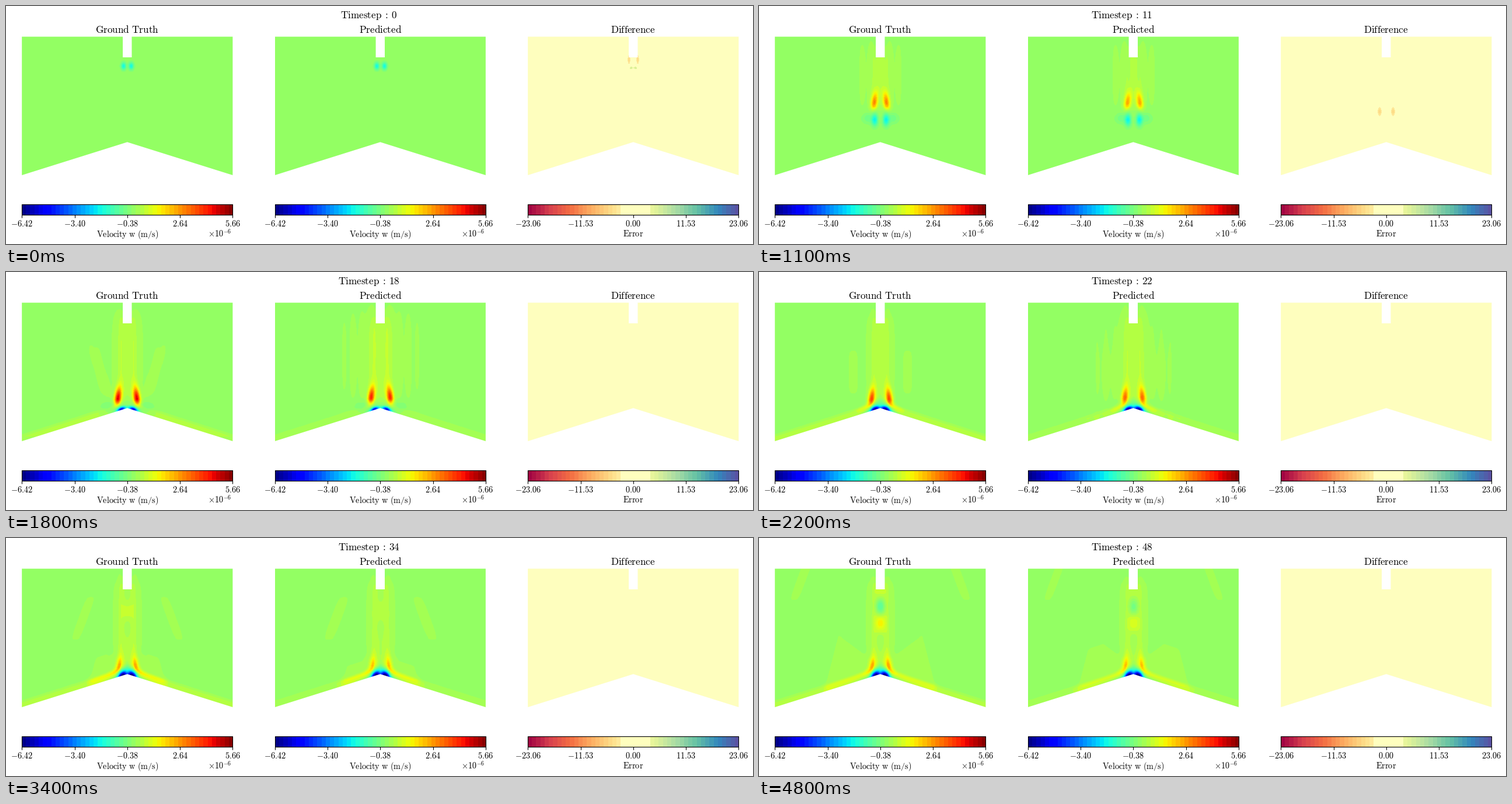
Write a matplotlib script that moves like this. It is 1280 px wide and 408 px high and loops after 4900 ms.

```python
import numpy as np
import matplotlib.pyplot as plt
from matplotlib.animation import FuncAnimation
from matplotlib.patches import Polygon, Rectangle

plt.rcParams["mathtext.fontset"] = "cm"

W, H, DPI = 1280, 408, 100
STEPS = 49
LEFT, PITCH, PANEL_W = 27.2, 433.5, 361.2
TOP, BOTTOM, APEX = 52.6, 290, 233.3
SLOT_BOTTOM, SLOT_HALF = 88, 7.7
BAR_TOP, BAR_BOTTOM = 340, 358
BIG, SMALL = 17.2, 14.3
BANDS = 50
VEL_RANGE = (-6.42, 5.66)
ERR_RANGE = (-23.06, 23.06)

fig = plt.figure(figsize=(W / DPI, H / DPI), dpi=DPI, facecolor="white")
ax = fig.add_axes([0, 0, 1, 1])

# Half-panel grid: distance from the axis, depth and height above the floor.
U, Y = np.meshgrid(np.arange(181.0), np.arange(53, BOTTOM) + 0.5)
FLOOR = APEX + U * (BOTTOM - APEX) / 180.5
Z = FLOOR - Y


def band_colors(name):
    return plt.get_cmap(name)((np.arange(BANDS) + 0.5) / BANDS)


JET = band_colors("jet")
SPECTRAL = band_colors("Spectral")
SPECTRAL[22:29] = plt.get_cmap("Spectral")(0.5)


def ramp(t, start, end, v0=0.0, v1=1.0):
    """Straight change from v0 to v1 between two steps, held outside."""
    return v0 + (v1 - v0) * np.clip((t - start) / (end - start), 0, 1)


def soft(x):
    """Smooth step from 0 to 1 around x = 0."""
    return 0.5 + 0.5 * np.tanh(x / 2)


def spot(du, dy, a, b):
    return np.exp(-((du / a) ** 2 + (dy / b) ** 2) / 2)


def plate(du, dy, a, b):
    """Flat patch with a firm rim."""
    return np.exp(-(du / a) ** 4 - (dy / b) ** 4)


def sinking_front(t):
    y = min(104 + 8.3 * t, 235)
    left = 1 - ramp(t, 14, 18)
    core = spot(U - 6 - 0.28 * t, Y - y, 3.1 + 0.07 * t, ramp(t, 0, 7, 4.5, 7.5))
    skirt = spot(U - ramp(t, 0, 18, 7, 30), Y - y + 3,
                 ramp(t, 0, 18, 3, 10), 6.5)
    return (-1.9 * left * core
            - 0.55 * ramp(t, 1, 5) * (1 - ramp(t, 18, 24)) * skirt)


def hot_trail(t, heat):
    """Teardrop that follows the front and cools once it has landed."""
    dy = Y - min(64 + 9.4 * t, 217 - 2 * (heat < 1))
    height = np.where(dy < 0, 13, 6.5)
    u = 10 + ramp(t, 13, 18, 0, 6) - ramp(t, 18, 27, 0, 2)
    amp = ramp(t, 0, 18, 0, 4.3) - ramp(t, 18, 27, 0, 3.6)
    return heat * amp * spot(U - u - 0.12 * dy, dy, 3.9, height)


def turning_jet(t, heat):
    """Rising stem that bends outward along the floor, as in corner flow."""
    reach = ramp(t, 18, 48, 30, 95)
    p, q = np.maximum(U - 9, 0), np.maximum(Z - 6, 0)
    off = (p * q - 45) / np.maximum(np.hypot(p, q), 1)
    landed = ramp(t, 17, 25)
    corner = 1.3 * landed * spot(U - 15, Z - 17, 7, 10)
    arm = ((1.3 * landed - ramp(t, 27, 40, 0, 0.85))
           * soft((U - 20) / 3) * soft((reach - U) / 3))
    stem = 0.38 * ramp(t, 6, 14) * soft((Y - 78) / 4)
    shown = soft((64 + 9.4 * t + ramp(t, 15, 20, 0, 100) - Y) / 5)
    return heat * shown * (stem + corner + arm) * np.exp(-(off / 3.4) ** 2 / 2)


def floor_sink(t):
    reach = ramp(t, 16, 48, 26, 95)
    core = spot(U - 10 + ramp(t, 18, 27, 0, 2), Z - 1, 5, ramp(t, 18, 27, 3, 5))
    layer = np.exp(-U / 32 - (Z / 2.6) ** 2 / 2) * soft((reach - U) / 4)
    middle = spot(U, Z - 7, 5, 6)
    return (-ramp(t, 14, 18, 0, 4.4) * core - ramp(t, 18, 27, 0, 0.8) * core
            - ramp(t, 14, 22, 0, 2) * layer - ramp(t, 18, 25) * middle)


def halo(t, fade):
    """Growing veil with fingered rim, later a skirt around the stems."""
    fingers = 1 + 0.35 * np.cos(0.4 * U)
    veil = plate(U, Y - 80 - 3.6 * t, max(4.2 * t - 5, 6), 30 + 2.8 * t)
    skirt = plate(U - 15, Y - 145, 11, 80)
    return (0.18 * ramp(t, 2, 6) * (1 - ramp(t, *fade)) * veil * fingers
            + 0.17 * ramp(t, 12, 18) * skirt)


def wisp(t, width):
    """Faint crescent drifting outward and up."""
    drift = max(t - 27, 0)
    dy = Y - 172 + 4.8 * drift
    lean = ramp(t, 18, 27, -0.3, 0.37)
    shape = plate(U - 46 - 4.2 * drift - lean * dy, dy, width, 46)
    return 0.15 * ramp(t, 14, 17) * shape


def foot(t, height):
    reach = ramp(t, 28, 48, 60, 97)
    roof = np.minimum(15 + 1.05 * U, height * ramp(t, 30, 48, 40, 92))
    return (0.16 * ramp(t, 30, 36) * soft((roof - Z) / 2)
            * soft((reach - U - 0.28 * Z) / 1.5))


def stack_wave(t, strength):
    """Standing column under the slot, its phase sinking slowly."""
    phase = 2 * np.pi * (Y - 103 - 1.7 * (t - 40)) / 66
    window = spot(U, Y - 130, 5.5, 26)
    return -strength * ramp(t, 30, 48, 0, 1.4) * np.cos(phase) * window


def truth(t):
    return (sinking_front(t) + hot_trail(t, 1) + turning_jet(t, 1)
            + floor_sink(t) + halo(t, (14, 20)) + wisp(t, 10)
            + foot(t, 1) + stack_wave(t, 1))


def predicted(t):
    return (sinking_front(t) + hot_trail(t, 0.86) + turning_jet(t, 0.86)
            + floor_sink(t) + halo(t, (18, 27))
            + ramp(t, 20, 26) * wisp(t, ramp(t, 27, 40, 15, 9))
            + foot(t, 0.75) + stack_wave(t, 0.65))


def error(t):
    lens = spot(U - 7 - ramp(t, 0, 7, 0, 4), Y - 93 - 8 * t,
                ramp(t, 0, 7, 2, 3), 7)
    dots = spot(U - 3.5, Y - 107, 2.8, 2.3)
    return (-5 + 5 * ramp(t, 13, 18)) * lens + ramp(t, 0, 2, 6, 0) * dots


def paint(half, limits, colors):
    lo, hi = limits
    idx = np.clip((half - lo) / (hi - lo) * BANDS, 0, BANDS - 1).astype(int)
    return colors[np.concatenate([idx[:, :0:-1], idx], axis=1)]


PANELS = [
    (r"Ground\ Truth", truth, VEL_RANGE, JET),
    ("Predicted", predicted, VEL_RANGE, JET),
    ("Difference", error, ERR_RANGE, SPECTRAL),
]


def text(x, y, tex, px, ha="center"):
    return fig.text(x / W, 1 - y / H, f"${tex}$", fontsize=px * 72 / DPI,
                    ha=ha, va="baseline", color="black")


def roman(words):
    return r"\mathrm{" + words + "}"


def draw_bar(left, limits, colors):
    ax.imshow(colors[None], aspect="auto", interpolation="nearest",
              extent=(left, left + PANEL_W, BAR_BOTTOM, BAR_TOP))
    ax.add_patch(Rectangle((left, BAR_TOP), PANEL_W, BAR_BOTTOM - BAR_TOP,
                           fill=False, ec="black", lw=0.8))
    for part in np.linspace(0, 1, 5):
        x = left + PANEL_W * part
        ax.plot([x, x], [BAR_BOTTOM, BAR_BOTTOM + 5], color="black", lw=0.8,
                solid_capstyle="butt")
        tick = limits[0] + (limits[1] - limits[0]) * part
        text(x, 378, f"{tick:.2f}", SMALL)


def add_panel(left, title, limits, colors):
    mid, right = left + PANEL_W / 2, left + PANEL_W
    image = ax.imshow(paint(np.zeros_like(U), limits, colors),
                      extent=(left, right, BOTTOM, TOP),
                      aspect="auto", interpolation="nearest")
    slot = (mid - SLOT_HALF, mid + SLOT_HALF)
    image.set_clip_path(Polygon([
        (left, TOP), (slot[0], TOP), (slot[0], SLOT_BOTTOM),
        (slot[1], SLOT_BOTTOM), (slot[1], TOP), (right, TOP),
        (right, BOTTOM), (mid, APEX), (left, BOTTOM)],
        transform=ax.transData))
    text(mid, 46, roman(title), BIG)
    draw_bar(left, limits, colors)
    if limits is VEL_RANGE:
        text(mid, 396, roman(r"Velocity\ w\ (m/s)"), SMALL)
        text(right - 2, 396, r"\times10^{-6}", SMALL, "right")
    else:
        text(mid, 395, roman("Error"), SMALL)
    return image


images = [add_panel(LEFT + PITCH * i, title, limits, colors)
          for i, (title, _, limits, colors) in enumerate(PANELS)]
ax.set_xlim(0, W)
ax.set_ylim(H, 0)
ax.axis("off")

word = text(573, 21, roman("Timestep"), BIG, "left")
colon = text(650, 21, roman(":"), BIG)
count = text(670, 21, "0", BIG, "right")


def update(step):
    for image, (_, field, limits, colors) in zip(images, PANELS):
        image.set_data(paint(field(step), limits, colors))
    shift = 4.3 if step > 9 else 0
    word.set_x((573 - shift) / W)
    colon.set_x((650 - shift) / W)
    count.set_x((670 + shift) / W)
    count.set_text(f"${step}$")
    return images + [word, colon, count]


anim = FuncAnimation(fig, update, frames=STEPS, interval=100, repeat=True,
                     repeat_delay=0, blit=False)
plt.show()
```
